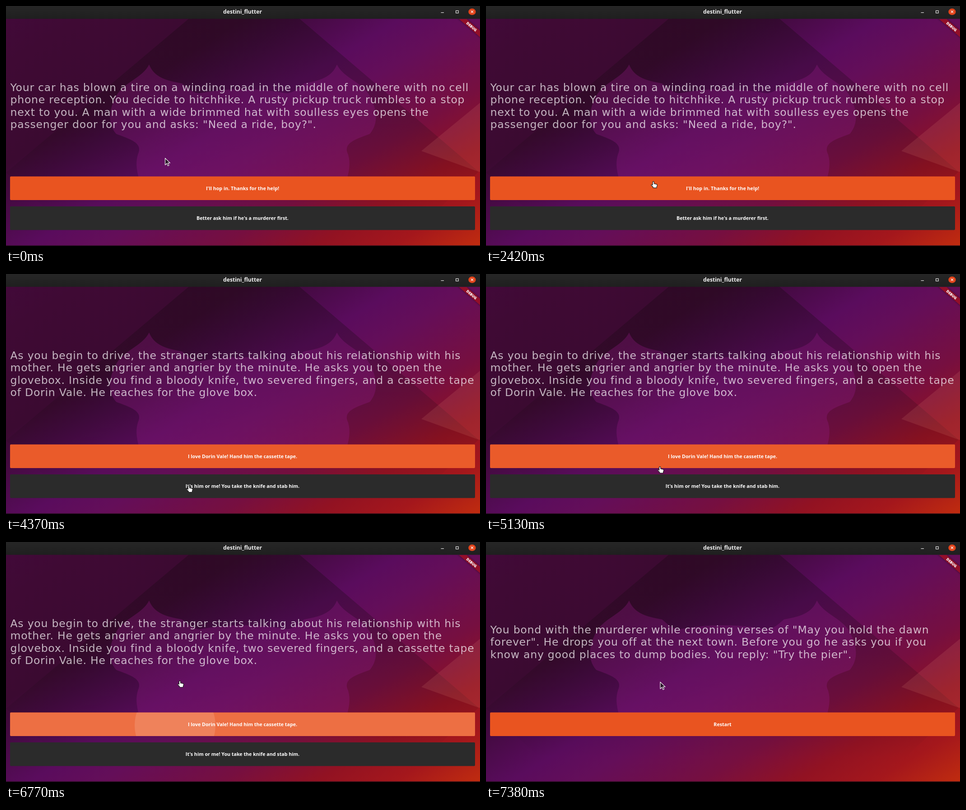
These frames come from a looping animation (1050x533 px, 8 s). An HTML page with a canvas:

```html
<!DOCTYPE html>
<html lang="en">
<head>
<meta charset="utf-8">
<title>destini_flutter</title>
<style>
  html, body { margin: 0; width: 100%; height: 100%; overflow: hidden; background: #222; }
  canvas { display: block; width: 1050px; height: 533px; }
</style>
</head>
<body>
<canvas id="stage"></canvas>
<script>
const W = 1050, H = 533, LOOP = 8000, STEP = 66;
const canvas = document.getElementById('stage');
const ctx = canvas.getContext('2d');
const dpr = window.devicePixelRatio || 1;
canvas.width = W * dpr;
canvas.height = H * dpr;

const STORY = '23.5px "DejaVu Sans", sans-serif';
const LABEL = '700 10.7px "Open Sans", sans-serif';
const ORANGE = '#e95420', DARK = '#2b2b2b';
const BUTTON_Y = [378.5, 445];
const BUTTON_H = 52.5;

const pages = [
  {
    start: 0,
    lines: [
      'Your car has blown a tire on a winding road in the middle of nowhere with no cell',
      'phone reception. You decide to hitchhike. A rusty pickup truck rumbles to a stop',
      'next to you. A man with a wide brimmed hat with soulless eyes opens the',
      'passenger door for you and asks: "Need a ride, boy?".'
    ],
    choices: ["I'll hop in. Thanks for the help!", "Better ask him if he's a murderer first."]
  },
  {
    start: 2490,
    lines: [
      'As you begin to drive, the stranger starts talking about his relationship with his',
      'mother. He gets angrier and angrier by the minute. He asks you to open the',
      'glovebox. Inside you find a bloody knife, two severed fingers, and a cassette tape',
      'of Dorin Vale. He reaches for the glove box.'
    ],
    choices: ['I love Dorin Vale! Hand him the cassette tape.', "It's him or me! You take the knife and stab him."]
  },
  {
    start: 6900,
    lines: [
      'You bond with the murderer while crooning verses of "May you hold the dawn',
      'forever". He drops you off at the next town. Before you go he asks you if you',
      'know any good places to dump bodies. You reply: "Try the pier".'
    ],
    choices: ['Restart']
  }
];

// Pointer moves: start time, number of steps, end point
const moves = [
  [570, 12, 375, 392], [1410, 3, 377, 402], [1950, 2, 371, 396.5],
  [2350, 9, 369, 340], [3830, 9, 405, 470], [4440, 2, 403, 472],
  [4640, 12, 379, 412], [5480, 7, 375, 406], [6360, 2, 369, 399],
  [6570, 4, 385, 308], [6800, 3, 386, 304], [7100, 5, 386, 311]
];

const arrow = new Path2D('M0 0V15L3.6 11.6L6.2 17L8.6 15.8L6 10.6H11Z');
const hand = new Path2D('M-1.6 1.4Q0 -.8 1.6 1.4V5.2L6.5 6.2Q8.8 6.8 8.6 9L7.4 12V14.5H-.6V12.6L-4.8 8.6Q-4.8 6.6 -2.8 7.2L-1.6 8.2Z');
const head = new Path2D('M317 130C328 158 355 166 390 172C400 180 410 192 428 194C490 182 560 182 622 194C640 192 650 180 660 172C695 166 722 158 733 130C748 160 790 170 806 200C822 230 826 260 806 284C775 296 745 304 758 330C764 350 760 370 752 395H298C290 370 286 350 292 330C305 304 275 296 244 284C224 260 228 230 244 200C260 170 302 160 317 130Z');

const clamp = v => Math.max(0, Math.min(1, v));
const ease = p => p * p * (3 - 2 * p);

function fade(x0, y0, x1, y1, stops) {
  const g = ctx.createLinearGradient(x0, y0, x1, y1);
  stops.forEach(([at, color]) => g.addColorStop(at, color));
  return g;
}

function polygon(points, fill) {
  ctx.beginPath();
  points.forEach(([x, y]) => ctx.lineTo(x, y));
  ctx.closePath();
  ctx.fillStyle = fill;
  ctx.fill();
}

function text(str, x, y, font, color, align = 'center', spacing = 0) {
  ctx.font = font;
  ctx.letterSpacing = spacing + 'px';
  ctx.textAlign = align;
  ctx.fillStyle = color;
  ctx.fillText(str, x, y);
}

function drawWallpaper() {
  ctx.fillStyle = fade(0, 0, 525, 855, [
    [0, '#42093a'], [.11, '#3f0a34'], [.3, '#3b0a31'], [.36, '#430a40'],
    [.48, '#5a0c5d'], [.56, '#640e59'], [.7, '#760f40'], [.81, '#921222'],
    [.9, '#a4171c'], [1, '#c02c0f']
  ]);
  ctx.fillRect(0, 0, W, H);
  polygon([[405, 28], [650, 28], [1047, 368], [870, H], [180, H], [0, 370]],
    fade(0, 28, 0, 480, [[0, 'rgba(20,8,14,.32)'], [.5, 'rgba(20,8,14,.2)'], [1, 'rgba(20,8,14,0)']]));
  polygon([[1050, 215], [920, 322], [1047, 368], [1050, 368]], 'rgba(255,180,150,.11)');
  ctx.fillStyle = 'rgba(150,28,135,.3)';
  ctx.fill(head);
}

function drawTitleBar() {
  ctx.fillStyle = fade(0, 0, 0, 28, [[0, '#262626'], [1, '#1f1f1f']]);
  ctx.fillRect(0, 0, W, 28.5);
  text('destini_flutter', 524, 17, '700 12.1px "Open Sans", sans-serif', '#f2f2f2');
  ctx.fillStyle = '#e6e6e6';
  ctx.fillRect(963.5, 14, 6.5, 1.2);
  ctx.strokeStyle = '#e6e6e6';
  ctx.lineWidth = 1.2;
  ctx.strokeRect(996.6, 10.4, 5.6, 5.2);
  ctx.beginPath();
  ctx.ellipse(1032.5, 12.8, 8.2, 7.2, 0, 0, 7);
  ctx.fillStyle = '#e2451b';
  ctx.fill();
  ctx.beginPath();
  ctx.moveTo(1029.8, 10.2); ctx.lineTo(1035.2, 15.4);
  ctx.moveTo(1035.2, 10.2); ctx.lineTo(1029.8, 15.4);
  ctx.strokeStyle = '#fff';
  ctx.stroke();
}

function drawBanner() {
  ctx.save();
  ctx.beginPath();
  ctx.rect(0, 29, W, H);
  ctx.clip();
  ctx.translate(1031.5, 45.8);
  ctx.rotate(.71);
  ctx.shadowColor = 'rgba(0,0,0,.5)';
  ctx.shadowBlur = 4 * dpr;
  ctx.fillStyle = '#930f29';
  ctx.fillRect(-50, -5.5, 100, 11);
  ctx.shadowBlur = 0;
  text('DEBUG', 0, 3, '800 8px "Open Sans", sans-serif', '#fff');
  ctx.restore();
}

function drawButton(label, i, t) {
  const y = BUTTON_Y[i];
  ctx.save();
  ctx.beginPath();
  ctx.roundRect(9, y, 1030, BUTTON_H, 2);
  ctx.fillStyle = i ? DARK : ORANGE;
  ctx.fill();
  if (!i) {
    ctx.clip();
    drawInk(t, y);
  }
  ctx.restore();
  text(label, 524, y + 30, LABEL, '#fff');
}

// Hover tint, pressed tint and the spreading ripple
function drawInk(t, y) {
  let tint = 0;
  if (t < 6900) tint = .045 * clamp((t - 4030) / 140) + .11 * clamp((t - 6500) / 200);
  ctx.fillStyle = `rgba(255,255,255,${tint})`;
  ctx.fillRect(0, y, W, BUTTON_H);
  if (t < 6570 || t > 7380) return;
  const r = 198 * Math.pow(clamp((t - 6500) / 460), 1.5);
  ctx.beginPath();
  ctx.arc(374.5, 407, r, 0, 7);
  ctx.fillStyle = `rgba(255,255,255,${.13 * (1 - clamp((t - 6900) / 450))})`;
  ctx.fill();
}

function pointerAt(t) {
  let x = 352.5, y = 338;
  for (const [start, steps, tx, ty] of moves) {
    if (t < start) break;
    const p = ease(Math.min(1, (Math.floor((t - start) / STEP) + 1) / steps));
    x += (tx - x) * p;
    y += (ty - y) * p;
  }
  return { x, y };
}

function drawPointer(t, page) {
  const { x, y } = pointerAt(t);
  const over = page.choices.some((_, i) => y >= BUTTON_Y[i] && y <= BUTTON_Y[i] + BUTTON_H);
  const isHand = over || (t >= 6570 && t < 6900);
  const shape = isHand ? hand : arrow;
  ctx.save();
  ctx.translate(x, y);
  ctx.lineJoin = 'round';
  ctx.lineWidth = 1.2;
  ctx.strokeStyle = isHand ? '#222' : '#eee';
  ctx.fillStyle = isHand ? '#fff' : '#2a1228';
  ctx.fill(shape);
  ctx.stroke(shape);
  ctx.restore();
}

function draw(t) {
  const page = pages.filter(p => t >= p.start).pop();
  ctx.setTransform(dpr, 0, 0, dpr, 0, 0);
  drawWallpaper();
  drawTitleBar();
  drawBanner();
  const top = page.lines.length === 4 ? 189 : 203;
  page.lines.forEach((line, i) =>
    text(line, 9.5, top + i * 27.25, STORY, 'rgba(255,255,255,.7)', 'left', .79));
  page.choices.forEach((label, i) => drawButton(label, i, t));
  ctx.fillStyle = '#1c0a14';
  ctx.fillRect(0, 531.7, W, 1.3);
  drawPointer(t, page);
}

const begin = performance.now();
function tick() {
  draw((performance.now() - begin) % LOOP);
  requestAnimationFrame(tick);
}
tick();
</script>
</body>
</html>
```
